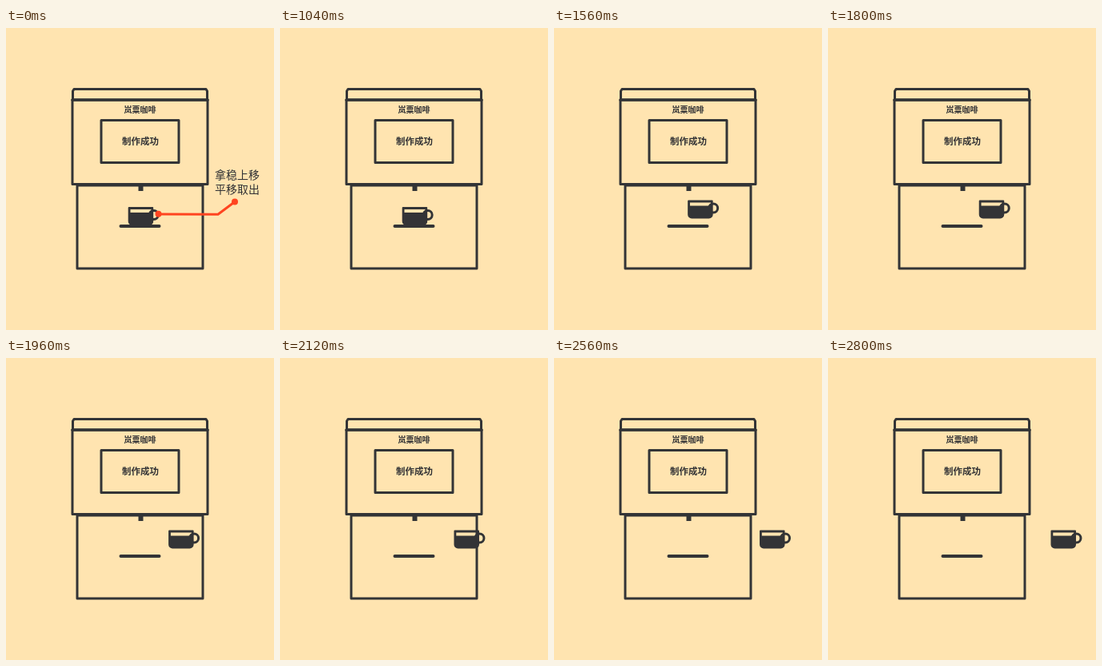
Animation of 335 by 378 pixels, one loop 3000 ms. Source, as an HTML page with a canvas:

```html
<!DOCTYPE html>
<html lang="zh-CN">
<head>
<meta charset="utf-8">
<style>
html, body { margin: 0; width: 100%; height: 100%; overflow: hidden; background: #ffe4b0; }
canvas { display: block; }
</style>
</head>
<body>
<canvas></canvas>
<script>
const W = 335, H = 378, LOOP = 3000;
const INK = '#333436', RED = '#ff4420', PAPER = '#ffe4b0';
const FONT = '"Noto Sans CJK SC", "Noto Sans CJK", sans-serif';
const LIFT = 1040, SLIDE = 1400, STOP = 2800;

const canvas = document.querySelector('canvas');
const ctx = canvas.getContext('2d');
const dpr = window.devicePixelRatio || 1;
canvas.width = W * dpr;
canvas.height = H * dpr;
canvas.style.width = W + 'px';
canvas.style.height = H + 'px';

const progress = (t, from, to) => Math.min(1, Math.max(0, (t - from) / (to - from)));

function line(points, width, color = INK) {
  ctx.beginPath();
  points.forEach(([x, y]) => ctx.lineTo(x, y));
  ctx.lineWidth = width;
  ctx.strokeStyle = color;
  ctx.stroke();
}

function box(x, y, w, h) {
  ctx.lineWidth = 3;
  ctx.strokeStyle = INK;
  ctx.strokeRect(x, y, w, h);
}

function dot(x, y, r) {
  ctx.beginPath();
  ctx.arc(x, y, r, 0, Math.PI * 2);
  ctx.fillStyle = RED;
  ctx.fill();
}

function text(str, x, y, size, weight) {
  ctx.font = `${weight} ${size}px ${FONT}`;
  ctx.fillStyle = INK;
  ctx.fillText(str, x, y);
}

function machine() {
  line([[83.5, 89], [83.5, 79], [85, 76.5], [250, 76.5], [251.5, 79], [251.5, 89]], 3);
  box(83, 90, 169, 105.5);
  line([[83, 90], [252, 90]], 3.6);
  box(119, 115.5, 97, 53);
  box(89, 197, 157, 104);
  ctx.fillStyle = INK;
  ctx.fillRect(165.5, 197, 6, 7);
  line([[143.5, 248], [191.5, 248]], 4);
  text('岚粟咖啡', 167.5, 105.8, 10, 700);
  text('制作成功', 168, 146.3, 11.5, 700);
}

function cup(x, y) {
  ctx.save();
  ctx.translate(x, y);
  ctx.beginPath();
  ctx.ellipse(32, 10, 5.5, 5.6, 0, 0, Math.PI * 2);
  ctx.lineWidth = 3;
  ctx.strokeStyle = INK;
  ctx.stroke();
  // body with an open strip above the coffee
  ctx.beginPath();
  ctx.roundRect(0, 0, 31.5, 23, [1, 1, 5, 5]);
  ctx.rect(2.8, 3, 26, 4);
  ctx.fillStyle = INK;
  ctx.fill('evenodd');
  ctx.restore();
}

function hint() {
  line([[190.5, 233], [265, 233.3], [286, 217.5]], 3, RED);
  dot(190.5, 232.8, 4);
  dot(286, 217.5, 4);
  text('拿稳上移', 289, 189.3, 14, 400);
  text('平移取出', 289, 207.3, 14, 400);
}

function draw(t) {
  ctx.setTransform(dpr, 0, 0, dpr, 0, 0);
  ctx.fillStyle = PAPER;
  ctx.fillRect(0, 0, W, H);
  ctx.lineCap = ctx.lineJoin = 'round';
  ctx.textAlign = 'center';
  machine();
  cup(152.7 + 125.8 * progress(t, SLIDE, STOP), 224 - 8.5 * progress(t, LIFT, SLIDE));
  if (t < LIFT) hint();
}

const start = performance.now();
function tick() {
  draw((performance.now() - start) % LOOP);
  requestAnimationFrame(tick);
}
tick();
</script>
</body>
</html>
```
